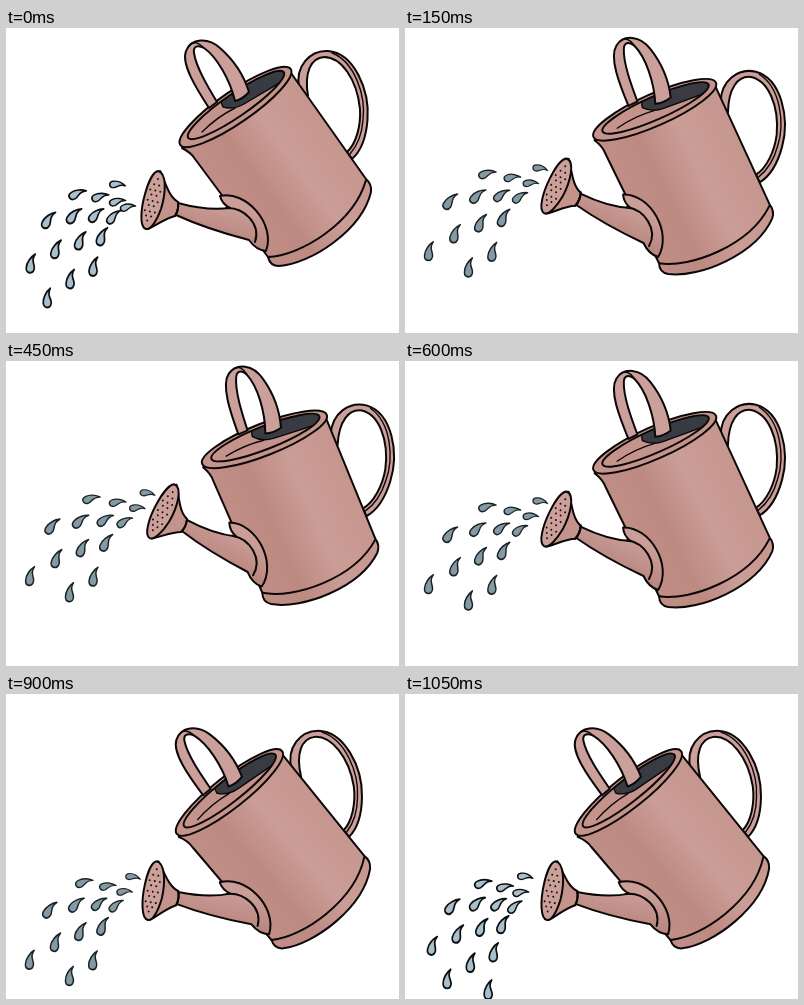
Write an HTML page that moves like this. It is 393 by 305 pixels and loops after 1.2 s.

```html
<!DOCTYPE html>
<html lang="en">
<head>
<meta charset="utf-8">
<title>Watering can</title>
<style>
  html, body { margin: 0; width: 100%; height: 100%; overflow: hidden; background: #fff; }
  svg { display: block; width: 100%; height: 100%; }
  .ink { stroke: #0b0707; stroke-width: 2; stroke-linecap: round; stroke-linejoin: round; }
  .line { fill: none; }
  .fine { stroke-width: 1.4; }
  .pink { fill: #c4948c; }
  .light { fill: #cba09a; }
  .drop { fill: #a9bfcb; stroke: #0b0d10; stroke-width: 2.1; stroke-linejoin: round; }
  .thin .drop { fill: #8399a4; stroke: #1b2226; stroke-width: 1.8; }
</style>
</head>
<body>
<svg viewBox="0 0 393 305">
  <defs>
    <linearGradient id="side" gradientUnits="userSpaceOnUse" x1="218" y1="185" x2="325" y2="105">
      <stop offset="0" stop-color="#c18f87"/>
      <stop offset=".35" stop-color="#bd8a82"/>
      <stop offset=".65" stop-color="#ca9d96"/>
      <stop offset="1" stop-color="#c6978f"/>
    </linearGradient>
    <linearGradient id="tube" gradientUnits="userSpaceOnUse" x1="208" y1="172" x2="200" y2="205">
      <stop offset="0" stop-color="#cb9f98"/>
      <stop offset="1" stop-color="#b98780"/>
    </linearGradient>
    <clipPath id="mouth"><ellipse cx="230" cy="77" rx="58" ry="11.5" transform="rotate(-34.5 230 77)"/></clipPath>
  </defs>
  <g id="can">
    <!-- rear handle -->
    <path class="ink light" d="M293 60C289 38 304 22 322 23C348 25 364 62 361.5 92C360 111 354 124 346 131L341 124C350 116 355 98 354 81C351 51 335 29 318 29C305 30 298 44 302 68Z"/>
    <path class="ink line fine" d="M326 25C349 34 360 68 357 92C356 106 351 118 344 126"/>

    <!-- body -->
    <path class="ink" fill="url(#side)" d="M176 120C182 123 186 126 189 131L262 229Q264 238 273 238C305 236 356 202 365 164Q366 156 360 151L285 45Z"/>
    <path class="ink line" d="M262 229C294 228 348 195 360 152"/>

    <!-- rim and opening -->
    <ellipse class="ink pink" cx="229.5" cy="79" rx="67" ry="16" transform="rotate(-34.5 229.5 79)"/>
    <g clip-path="url(#mouth)">
      <rect class="pink" x="170" y="30" width="120" height="100"/>
      <path class="ink fine" fill="#383c42" d="M212 66L217 79Q228 82 238 76L285 48V30H225Z"/>
      <path class="ink line fine" d="M196 104C207 93 217 86 229 80"/>
    </g>
    <ellipse class="ink line" cx="230" cy="77" rx="58" ry="11.5" transform="rotate(-34.5 230 77)"/>

    <!-- top handle -->
    <path class="ink light" d="M203 80C190 60 175 36 180 23C185 10 202 9 214 20C230 34 239 51 243 64Q237 71 229 73C224 52 211 29 198 20C191 16 187 19 188 25C190 39 202 59 211 74Z"/>
    <path class="ink line fine" d="M183 18C187 13 192 14 198 20"/>

    <!-- spout -->
    <path class="ink" fill="url(#tube)" d="M214 168C240 162 270 196 260 223Q250 222 243 212C220 206 194 198 170 187L172 175C190 180 208 182 224 180Q216 176 214 168Z"/>
    <path class="ink line" d="M220 180C238 179 255 196 249 214"/>
    <path class="ink pink" d="M154 143C160 156 163 169 172 174Q173 182 169 188C160 190 151 197 142 201Z"/>
    <path class="ink light" d="M152 143C161 145 160 165 155 181C151 192 145 202 140 201C133 199 135 180 139 166C142 155 147 144 152 143Z"/>
    <path class="ink line" d="M172 174Q173 182 169 188"/>
    <g id="holes" fill="#1a0f0e"></g>
  </g>
  <g id="water"></g>
</svg>
<script>
const LOOP = 1200, STEP = 150, STREAMS = 4;
const TEAR = 'M5-11C0-8-5-2-5 4C-5 10 4 11 5 4C5-1 0-4 5-11Z';
const can = document.getElementById('can');
const water = document.getElementById('water');

// x, y place the left end of the rim; tilt is in degrees.
const pivot = { x: 174, y: 114 }, lip = { x: 130, y: 157 };
const level = { x: 174, y: 114, tilt: 0 };
const raised = { x: 188.7, y: 106, tilt: 10.6 };
const high = { x: 196.5, y: 100, tilt: 13 };
const low = { x: 170.3, y: 137, tilt: -3.7 };

// rate: drops per stream; phase: how far the drops have moved on; lift: height of the arc.
const steady = { rate: 4, phase: 0.4, lift: 12 };
const sparse = { rate: 3.5, phase: 0.05, lift: 12, thin: true };
const burst = { rate: 5, phase: 0.15, lift: 42 };
const falling = { rate: 4, phase: 0.2, lift: 10 };

const steps = [
  [level, steady], [raised, sparse], [high, burst], [high, sparse],
  [raised, sparse], [level, steady], [low, sparse], [low, falling]
];

function lipAt({ x, y, tilt }) {
  const a = tilt * Math.PI / 180, dx = lip.x - pivot.x, dy = lip.y - pivot.y;
  return {
    x: x + dx * Math.cos(a) - dy * Math.sin(a),
    y: y + dx * Math.sin(a) + dy * Math.cos(a)
  };
}

const curve = (a, b, c, t) => (1 - t) ** 2 * a + 2 * t * (1 - t) * b + t * t * c;
const slope = (a, b, c, t) => (1 - t) * (b - a) + t * (c - b);

// Each stream is a quadratic arc; drops sit on it at even intervals.
function stream(i, from, { rate, phase, lift }) {
  const endX = 20 + 21 * i;
  const xs = [from.x - 2 * i, endX + 8, endX];
  const ys = [from.y + 7 * i, from.y - lift + 13 * i, from.y + 114];
  let out = '';
  for (let n = (phase + 0.6 * i) % 1; n <= rate; n++) {
    const t = n / rate;
    if (t < 0.01) continue;
    const x = curve(...xs, t), y = curve(...ys, t);
    const angle = Math.atan2(-slope(...xs, t), slope(...ys, t)) * 180 / Math.PI;
    const size = 0.72 + 0.23 * Math.min(1, 2 * t);
    out += `<path class="drop" d="${TEAR}" transform="translate(${x} ${y}) rotate(${angle - 8}) scale(${size * 0.85} ${size})"/>`;
  }
  return out;
}

function drawHoles() {
  let dots = '';
  for (let row = 0; row < 9; row++) {
    const count = row % 8 ? 3 - row % 2 : 1;
    for (let i = 0; i < count; i++) {
      const x = 152 - row * 1.35 + (i - (count - 1) / 2) * 5;
      const y = 151 + row * 5.2 + i * 1.2;
      dots += `<circle cx="${x}" cy="${y}" r="1"/>`;
    }
  }
  document.getElementById('holes').innerHTML = dots;
}

let shown = -1;
function draw(time) {
  const n = Math.floor((time % LOOP) / STEP);
  if (n === shown) return;
  shown = n;
  const [pose, spray] = steps[n];
  can.setAttribute('transform',
    `translate(${pose.x} ${pose.y}) rotate(${pose.tilt}) translate(${-pivot.x} ${-pivot.y})`);
  water.setAttribute('class', spray.thin ? 'thin' : '');
  const from = lipAt(pose);
  water.innerHTML = Array.from({ length: STREAMS }, (_, i) => stream(i, from, spray)).join('');
}

drawHoles();
draw(0);
let start;
requestAnimationFrame(function tick(now) {
  start ??= now;
  draw(now - start);
  requestAnimationFrame(tick);
});
</script>
</body>
</html>
```
